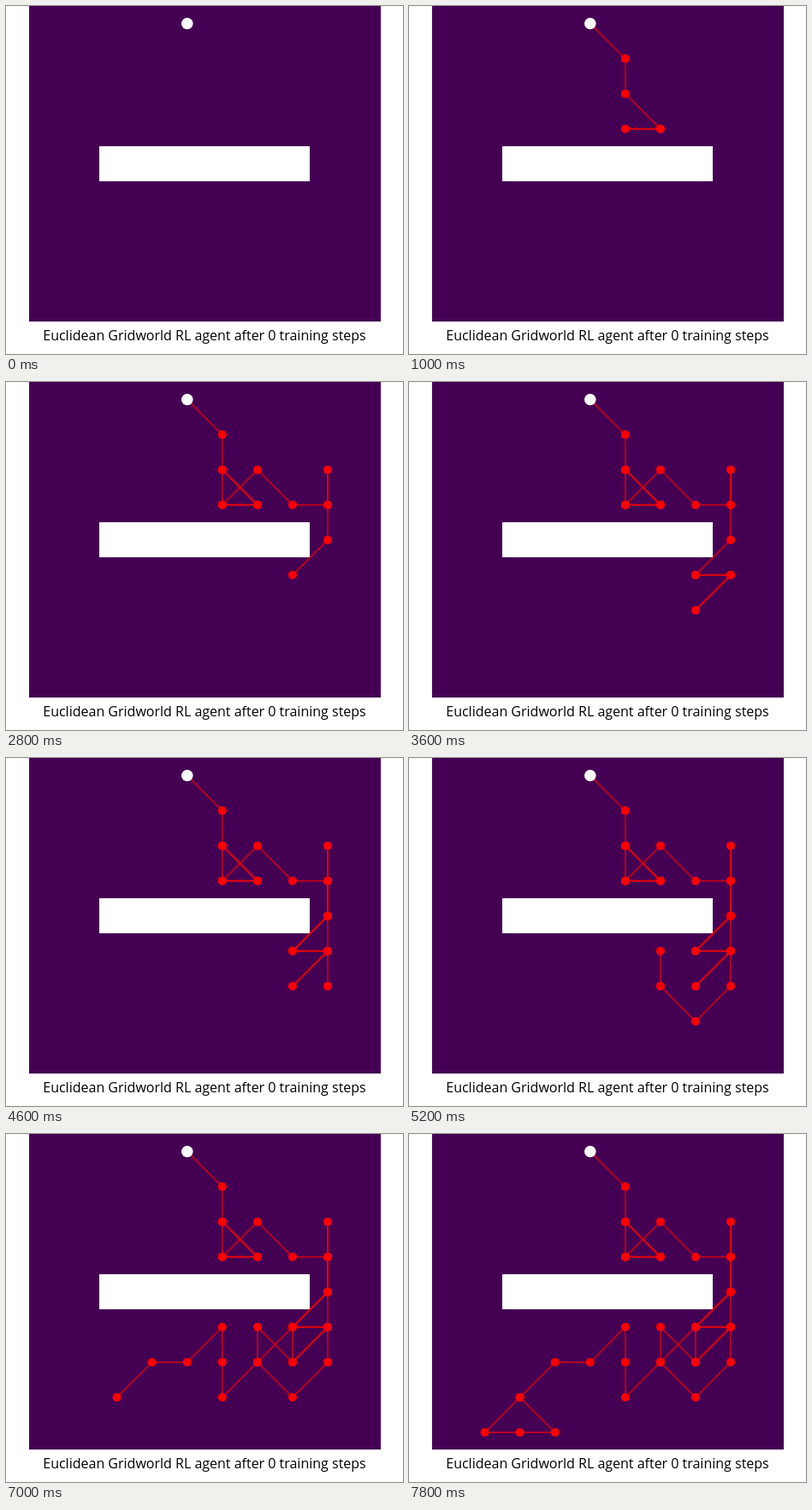
Animation, 464 px wide and 407 px high, one loop 8 s. Source, as an HTML page with a canvas:

```html
<!DOCTYPE html>
<html lang="en">
<head>
<meta charset="utf-8">
<title>Gridworld agent</title>
<style>
  html, body { margin: 0; width: 100%; height: 100%; overflow: hidden; background: #fff; }
  canvas { display: block; }
</style>
</head>
<body>
<canvas id="stage" width="464" height="407"></canvas>
<script>
const ctx = document.getElementById('stage').getContext('2d');
const STEP_MS = 200, LOOP_MS = 8000, CELL = 41.06;

// Visited cells, each written as column then row.
const path = (
  '40 51 52 63 53 63 52 53 62 73 83 82 83 84 75 85 76 85 75 84 83 84 85 86 77 ' +
  '66 65 76 75 66 57 56 55 46 36 27 38 28 18 27'
).split(' ').map(([col, row]) => [
  27 + CELL * (+col + 0.5),
  CELL * (+row + 0.5)
]);

function dot([x, y], radius, color) {
  ctx.fillStyle = color;
  ctx.beginPath();
  ctx.arc(x, y, radius, 0, Math.PI * 2);
  ctx.fill();
}

function segment(from, to) {
  ctx.beginPath();
  ctx.moveTo(...from);
  ctx.lineTo(...to);
  ctx.stroke();
}

function drawWorld() {
  ctx.fillStyle = '#fff';
  ctx.fillRect(0, 0, 464, 407);
  ctx.fillStyle = '#440154';
  ctx.fillRect(27, 0, 411, 369);
  ctx.fillStyle = '#fff';
  ctx.fillRect(109, 164, 246, 41);

  ctx.fillStyle = '#000';
  ctx.font = '16px "Open Sans", sans-serif';
  ctx.textAlign = 'center';
  ctx.fillText('Euclidean Gridworld RL agent after 0 training steps', 232, 391);
}

function drawTrail(steps) {
  // Translucent strokes make repeated moves brighter.
  ctx.strokeStyle = 'rgba(255, 0, 0, 0.6)';
  ctx.lineWidth = 2;
  for (let i = 1; i <= steps; i++) segment(path[i - 1], path[i]);
  for (let i = 1; i <= steps; i++) dot(path[i], 5, '#f00');
  dot(path[0], 6.8, '#fff');
}

function frame() {
  const time = performance.now() % LOOP_MS;
  drawWorld();
  drawTrail(Math.floor(time / STEP_MS));
  requestAnimationFrame(frame);
}
frame();
</script>
</body>
</html>
```
